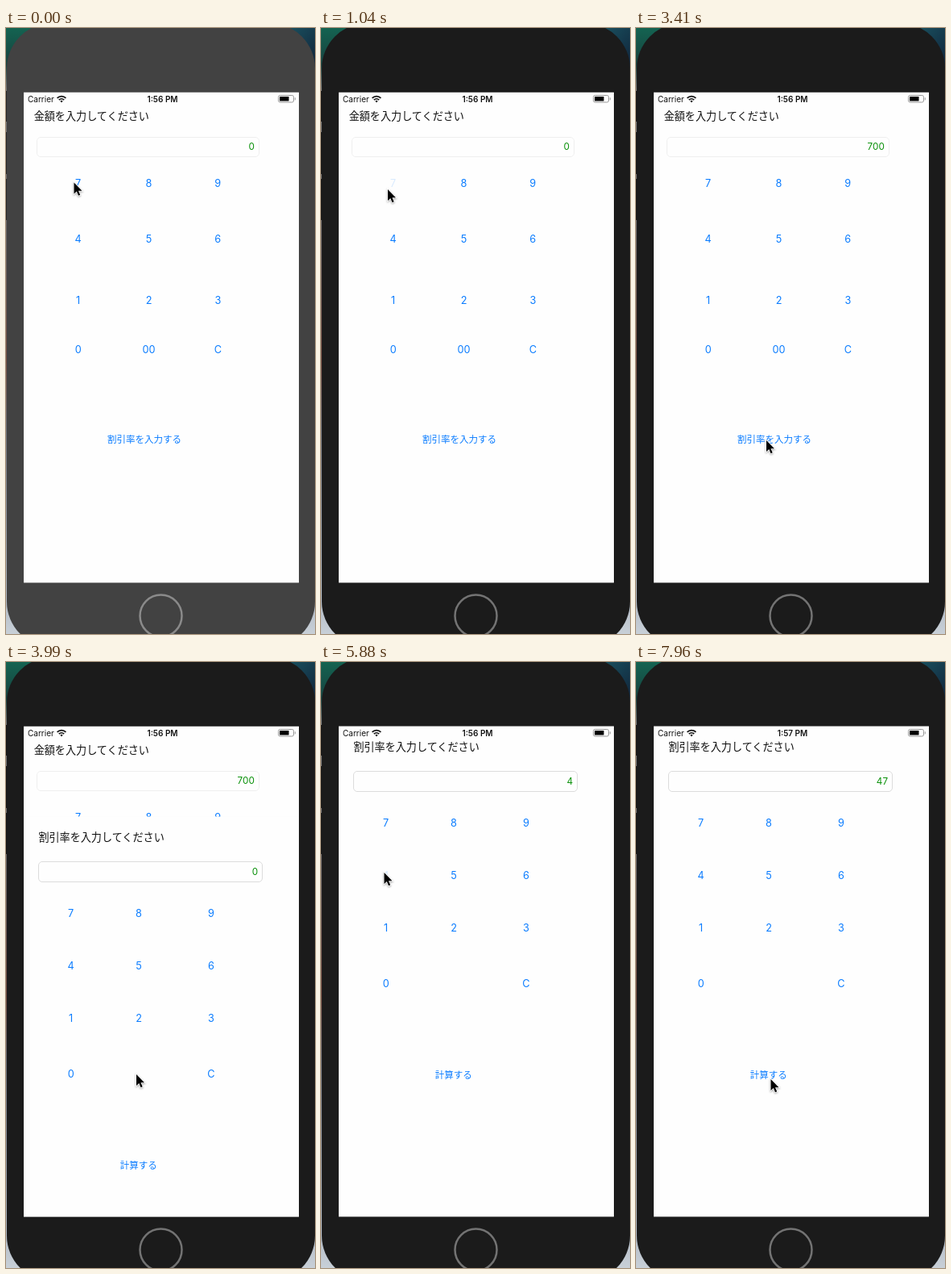
Write an HTML page that moves like this. It is 384 by 751 pixels and loops after 8 s.

```html
<!DOCTYPE html>
<html lang="ja">
<head>
<meta charset="utf-8">
<title>Discount calculator</title>
<style>
  html, body { margin: 0; width: 100%; height: 100%; overflow: hidden; background: #1b1b1b; }
  svg { display: block; width: 384px; height: 751px; }
  text { font-family: Inter, Roboto, "Noto Sans CJK JP", "Noto Sans CJK", sans-serif; }
  .status { font-size: 10px; fill: #111; }
  .title { font-size: 13.1px; fill: #111; }
  .key { font-size: 12.7px; fill: #0a7cff; text-anchor: middle; }
  .action { font-size: 11.5px; fill: #0a7cff; }
  .value { font-size: 11.7px; fill: #089008; text-anchor: end; }
  .title, .action { font-family: "Noto Sans CJK JP", "Noto Sans CJK", sans-serif; }
</style>
</head>
<body>
<svg id="stage" viewBox="0 0 384 751">
  <defs>
    <linearGradient id="desk" x2="0" y2="1">
      <stop offset="0" stop-color="#146351"/>
      <stop offset=".06" stop-color="#17423f"/>
      <stop offset=".1" stop-color="#777"/>
      <stop offset=".35" stop-color="#6a6464"/>
      <stop offset=".55" stop-color="#7a5146"/>
      <stop offset=".66" stop-color="#70727a"/>
      <stop offset=".95" stop-color="#b4bcc6"/>
      <stop offset="1" stop-color="#c8d0d8"/>
    </linearGradient>
    <linearGradient id="sky" x2="1" y2="1">
      <stop offset="0" stop-color="#1b5663"/>
      <stop offset="1" stop-color="#10233a"/>
    </linearGradient>
    <clipPath id="glass"><rect x="22" y="79.5" width="342" height="608"/></clipPath>
  </defs>
  <rect width="384" height="751" fill="url(#desk)"/>
  <rect x="340" width="44" height="50" fill="url(#sky)"/>
  <rect id="body" x="1" y="-6" width="383" height="773" rx="56"/>
  <path id="side" d="M.5 78V116M.5 129V181M.5 187V238"/>
  <circle id="home" cx="192.5" cy="728.5" r="26" fill="none" stroke-width="2.5"/>
  <g clip-path="url(#glass)">
    <g id="price"></g>
    <g id="rate"></g>
  </g>
  <text class="status" x="27" y="91.7">Carrier</text>
  <g fill="none" stroke="#111" stroke-width="1.7">
    <path d="M63.6 86.8a7.6 7.6 0 0 1 10.8 0M65.8 89.1a4.5 4.5 0 0 1 6.4 0"/>
    <path d="M69 92.4l-1.6-1.8a2.3 2.3 0 0 1 3.2 0z" fill="#111" stroke="none"/>
  </g>
  <text id="clock" class="status" x="194.5" y="91.7" font-weight="600" text-anchor="middle"></text>
  <rect x="338.5" y="83.5" width="19" height="8.5" rx="2" fill="none" stroke="#999"/>
  <rect x="340" y="85" width="11.5" height="5.5" rx=".6" fill="#000"/>
  <path d="M359.3 86.3v3" stroke="#999"/>
  <path id="cursor" d="M0 0V14L3.3 11 5.5 16.2 7.7 15.3 5.5 10.3H10Z" stroke="#fff" stroke-width="1.6" paint-order="stroke" style="filter:drop-shadow(0 1px 1px rgba(0,0,0,.35))"/>
</svg>
<script>
const $ = id => document.getElementById(id);
const LOOP = 8000;

function add(parent, tag, attrs, text = "") {
  const el = document.createElementNS("http://www.w3.org/2000/svg", tag);
  for (const name in attrs) el.setAttribute(name, attrs[name]);
  el.textContent = text;
  return parent.appendChild(el);
}

// One keypad page; returns its elements by label.
function page(root, o) {
  add(root, "rect", { x: 22, y: 79.5, width: 342, height: 608, fill: "#fefefe" });
  add(root, "text", { class: "title", x: o.title[1], y: o.title[2] }, o.title[0]);
  const [x, y, width, height] = o.field;
  add(root, "rect", { x, y, width, height, rx: 4.5, fill: "none", stroke: o.line });
  const parts = { value: add(root, "text", { class: "value", x: o.value[0], y: o.value[1] }) };
  o.keys.forEach((label, i) => {
    if (!label) return;
    const pos = { class: "key", x: o.cols[i % 3], y: o.rows[Math.floor(i / 3)] + 4.6 };
    parts[label] = add(root, "text", pos, label);
  });
  parts.action = add(root, "text", { class: "action", x: o.action[1], y: o.action[2] }, o.action[0]);
  return parts;
}

const digits = ["7", "8", "9", "4", "5", "6", "1", "2", "3", "0"];
const price = page($("price"), {
  title: ["金額を入力してください", 34.7, 113.6],
  field: [38.5, 135.5, 276, 24], line: "#efefef",
  value: [308.8, 151.3],
  keys: [...digits, "00", "C"],
  cols: [89.7, 177.5, 263.3], rows: [192.5, 261.5, 337.5, 398],
  action: ["割引率を入力する", 126, 513.5]
});
const rate = page($("rate"), {
  title: ["割引率を入力してください", 40.4, 109.6],
  field: [40.5, 135.5, 278, 25], line: "#dcdcdc",
  value: [313, 152],
  keys: [...digits, "", "C"],
  cols: [80.7, 165, 255], rows: [199.5, 264.3, 329.3, 398],
  action: ["計算する", 141.7, 516]
});

const ticks = [[0, 0], [3850, 26], [5880, 40], [7960, 54], [8108, 55]];

// Pointer stops: [tick, x, y]
const stops = [
  [0, 84.5, 191.5], [1, 84.5, 191.5], [4, 83, 200], [9, 83, 200], [14, 162, 394],
  [15, 174, 399.5], [19, 174, 399.5], [23, 162, 511], [28, 162, 511], [32, 179, 369],
  [33, 158.5, 256], [34, 159, 257], [35, 159, 257], [39, 78.5, 261], [41, 78.5, 261],
  [43, 78.5, 189.5], [47, 78.5, 189.5], [53, 166, 508.5], [54, 167.5, 517]
];

// Held buttons: [element, first tick, release tick]
const presses = [
  [price["7"], 7, 8], [price["00"], 16, 18], [price.action, 24, 26],
  [rate["4"], 39, 41], [rate["7"], 44, 46]
];

const smooth = k => k * k * (3 - 2 * k);

function along(list, at, ease = k => k) {
  let i = 1;
  while (i < list.length - 1 && list[i][0] <= at) i++;
  const a = list[i - 1], b = list[i];
  const k = ease(Math.min(1, (at - a[0]) / (b[0] - a[0])));
  return a.slice(1).map((v, j) => v + (b[j + 1] - v) * k);
}

function draw(ms) {
  const n = Math.floor(along(ticks, ms)[0] + 0.03);
  const active = n >= 7;
  $("body").setAttribute("fill", active ? "#1b1b1b" : "#424242");
  $("side").setAttribute("stroke", active ? "#141414" : "#262626");
  $("home").setAttribute("stroke", active ? "#737373" : "#8a8a8a");
  $("clock").textContent = n < 48 ? "1:56 PM" : "1:57 PM";

  price.value.textContent = n < 8 ? "0" : n < 18 ? "7" : "700";
  rate.value.textContent = n < 40 ? "0" : n < 46 ? "4" : "47";
  for (const [el, from, to] of presses) {
    el.setAttribute("opacity", n >= from && n < to ? 0.15 : n === to ? 0.75 : 1);
  }

  // Critically damped slide of the second page
  const u = 1.05 + 2.05 * (n - 26);
  const drop = n < 26 ? 608 : 608 * (1 + u) * Math.exp(-u);
  $("rate").setAttribute("transform", `translate(0 ${Math.round(drop)})`);

  const [x, y] = along(stops, n, smooth);
  $("cursor").setAttribute("transform", `translate(${x} ${y})`);
}

function loop() {
  draw(performance.now() % LOOP);
  requestAnimationFrame(loop);
}
loop();
</script>
</body>
</html>
```
